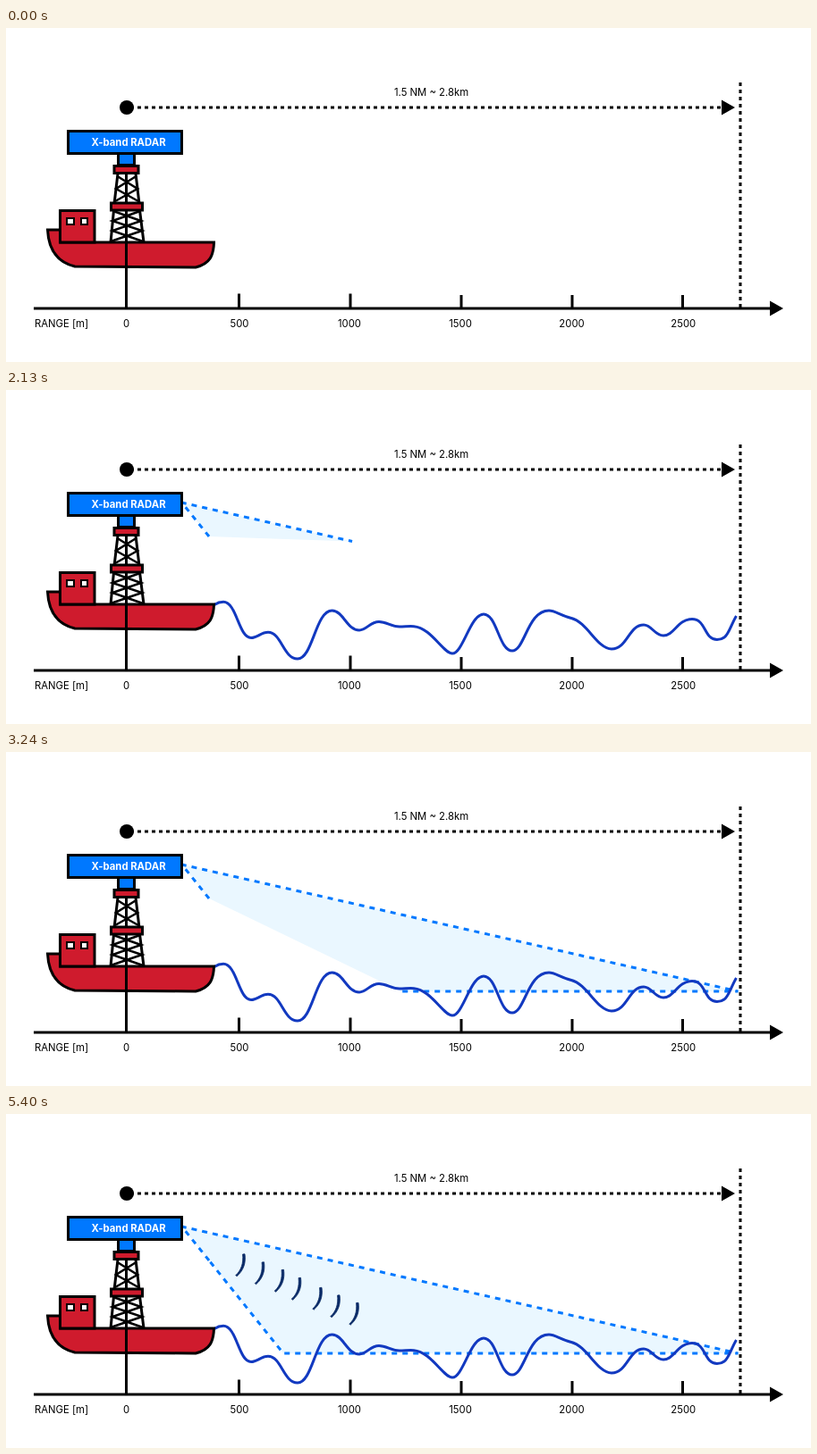
Write an HTML page that moves like this. It is 900 px wide and 374 px high and loops after 5460 ms.

```html
<!DOCTYPE html>
<html lang="en">
<head>
<meta charset="utf-8">
<title>Radar range</title>
<style>
  html, body { margin: 0; width: 100%; height: 100%; overflow: hidden; background: #fff; }
  svg { display: block; width: 900px; height: 374px; }
  text { font: 11.3px Inter, Arial, sans-serif; fill: #000; }
  .mid { text-anchor: middle; }
  .sign { font-weight: 700; fill: #fff; }

  .line { fill: none; stroke: #000; stroke-width: 3; }
  .dots { stroke-dasharray: 4 4; }
  .red { fill: #cf1b2d; stroke: #000; stroke-width: 3; }
  .blue { fill: #0078ff; stroke: #000; stroke-width: 3; }
  .brace { fill: none; stroke: #000; stroke-width: 2.5; }
  .pane { fill: #fff; stroke: #000; stroke-width: 2; }

  .wave, .beam, .echoes, .echoes use { animation: 5460ms linear infinite both; }

  .wave {
    fill: none; stroke: #1239c0; stroke-width: 3; stroke-linejoin: round;
    stroke-dasharray: 1 2; animation-name: draw;
  }
  /* 0 to 1800 ms */
  @keyframes draw {
    0% { stroke-dashoffset: 1; }
    32.967%, 100% { stroke-dashoffset: 0; }
  }

  .beam {
    fill: #eaf7ff; stroke: #0078ff; stroke-width: 3; stroke-dasharray: 6 6;
    animation-name: sweep;
  }
  /* 1800 to 3600 ms, one side after the other at an even speed */
  @keyframes sweep {
    0%, 32.967% { d: path("M227 164L227 164L227 164L227 164L227 164"); }
    34.18% { d: path("M227 164L196.5 126L196.5 126L196.5 126L196.5 126"); }
    50.01% { d: path("M227 164L196.5 126L818.5 268L818.5 268L818.5 268"); }
    62.63% { d: path("M227 164L196.5 126L818.5 268L310 268L310 268"); }
    65.934%, 100% { d: path("M227 164L196.5 126L818.5 268L310 268L227 164"); }
  }

  .echoes { fill: #0a2a66; stroke: #0a2a66; stroke-width: .8; animation-name: ink; }
  /* hidden at first; the outlines fill in from 4800 to 5400 ms */
  @keyframes ink {
    0%, 65.2% { opacity: 0; fill-opacity: 0; }
    65.21%, 87.912% { opacity: 1; fill-opacity: 0; }
    98.901%, 100% { opacity: 1; fill-opacity: 1; }
  }

  .echoes use {
    stroke-dasharray: 1 2;
    animation-name: trace;
    animation-delay: calc(3560ms + var(--i) * 200ms);
  }
  @keyframes trace {
    0% { stroke-dashoffset: 1; }
    10.989%, 35% { stroke-dashoffset: 0; }
    35.01%, 100% { stroke-dashoffset: 1; }
  }
</style>
</head>
<body>
<svg viewBox="0 0 900 374">
  <defs>
    <path id="echo" pathLength="1" d="M267 156.8L264.6 157C265.6 167 263 175 256.8 180.6L258 181.8C266 175 268.4 166 267 156.8Z"/>
  </defs>

  <!-- distance -->
  <path class="line dots" d="M139 89H800M821 61V314"/>
  <circle cx="135" cy="89" r="8"/>
  <path d="M800 80.5L815 89L800 97.5Z"/>
  <text class="mid" x="475.5" y="76">1.5 NM ~ 2.8km</text>

  <!-- range axis -->
  <path class="line" d="M31 314H856M260.5 297.5V314M385 297.5V314M509 299V314M633 299V314M756.5 299V314"/>
  <path d="M854 305.5L869 314L854 322.5Z"/>
  <text x="32" y="335">RANGE [m]</text>
  <g class="mid">
    <text x="134.5" y="335">0</text>
    <text x="261" y="335">500</text>
    <text x="384" y="335">1000</text>
    <text x="508" y="335">1500</text>
    <text x="632.5" y="335">2000</text>
    <text x="757.3" y="335">2500</text>
  </g>

  <path class="beam" d="M227 164"/>
  <path class="wave" pathLength="1" d="M233 240.5C236 238.5 239 237.3 243 237.3C258 237.3 260 277.5 274 277.5
    C281 277.5 285 271.3 293 271.3C308 271.3 310 301 326 301C343 301 346 247 364.5 247
    C377 247 381 269 395 269C403 269 407 259.5 417 259.5C426 259.5 430 265 440 265
    C446 265 450 264.3 456 264.7C475 266 489 295 499 295C511 295 519 251 534 251
    C549 251 551 292 566 292C580 292 583 247 607 247C614 247 619 252 632 255.5
    C650 260 661 290 677 290C695 290 696 263 713 263C722 263 725 275 735 275
    C747 275 751 256.5 767 256.5C783 256.5 780 279.5 795 279.5C799 279.5 801 278.5 803 277
    C808 274 811 262 816.5 253"/>

  <!-- ship -->
  <path class="red" d="M46.5 226H61V240H232.5C232 255 228 264 212 268L77 267C56 262 47.5 247 46.5 226Z"/>
  <rect class="red" x="60.5" y="204.5" width="38.5" height="35.5"/>
  <rect class="pane" x="68" y="213" width="8" height="7"/>
  <rect class="pane" x="84" y="213" width="7" height="7"/>

  <!-- mast -->
  <path class="brace" d="M124.5 166L147 180L122 194M145.5 166L123 180L148 194
    M120 205L151 216L119 227L153 239M150 205L119 216L152 227L117 239"/>
  <path class="line" d="M125 163L121 197M145 163L149 197M120.5 204L117 240M149.5 204L154 240M134.5 162V314"/>
  <rect class="red" x="121" y="154.5" width="27" height="8"/>
  <rect class="red" x="117.5" y="196" width="35" height="8"/>
  <rect class="blue" x="125.5" y="140.5" width="18" height="13"/>
  <rect class="blue" x="69.5" y="115.5" width="127" height="25"/>
  <text class="mid sign" x="137" y="132">X-band RADAR</text>

  <g class="echoes">
    <use href="#echo" style="--i:0"/>
    <use href="#echo" x="21.5" y="9" style="--i:1"/>
    <use href="#echo" x="43.5" y="17.5" style="--i:2"/>
    <use href="#echo" x="62.5" y="26.5" style="--i:3"/>
    <use href="#echo" x="86" y="37.5" style="--i:4"/>
    <use href="#echo" x="106" y="46" style="--i:5"/>
    <use href="#echo" x="127" y="54.5" style="--i:6"/>
  </g>
</svg>
</body>
</html>
```
